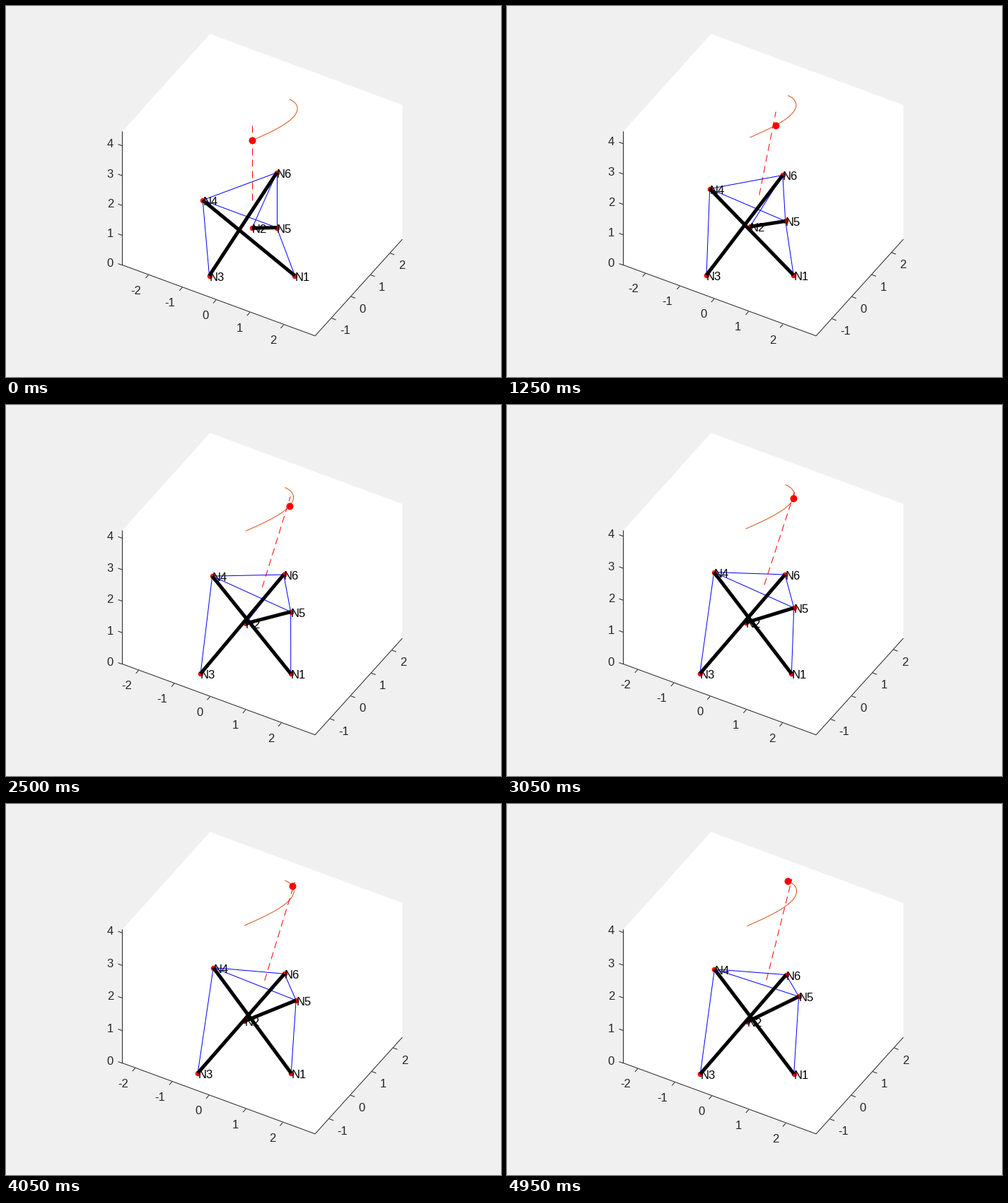
Recreate the animation shown at these times as a matplotlib script. Size 700x525 px, loop 5000 ms.

```python
import numpy as np
import matplotlib.pyplot as plt
from matplotlib.animation import FuncAnimation

W, H, DPI = 700, 525, 100
FRAMES, INTERVAL = 100, 50
PX = 72 / DPI                      # points per pixel
DARK = (0.15, 0.15, 0.15)

# Orthographic view: azimuth 30 deg, elevation 40 deg.
AZ, EL = np.radians([30, 40])
CORNER, FRONT, RIGHT = (164, 366), (436.6, 466.3), (560, 329.6)
BOX = [(164, 177), (288, 39), (560, 139.5), RIGHT, FRONT, CORNER]

RADIUS = 1.267                     # both triangles
AXIS_LENGTH = 2.5                  # dashed normal of the upper triangle
CABLES = [(4, 6), (4, 3), (4, 5), (6, 5), (6, 2), (5, 1)]
BARS = [(3, 6), (4, 1), (2, 5)]


def waves(u):
    """Quarter wave that climbs to 1, half wave that swings out and back."""
    return np.sin(np.pi * u / 2), np.sin(np.pi * u)


def smoothstep(x):
    x = np.clip(x, 0, 1)
    return x * x * (3 - 2 * x)


def dot_path(u):
    rise, sway = waves(u)
    return np.array([0.45 * sway, 1.9 * rise, 4 + 0 * u])


def triangle(centre, ex, ey, start):
    angles = np.radians(start + 120 * np.arange(3))
    return [centre + RADIUS * (np.cos(a) * ex + np.sin(a) * ey)
            for a in angles]


def platform(u):
    """Centre, unit normal and corners of the tilting upper triangle."""
    rise, sway = waves(u)
    centre = np.array([0.19 * u + 0.13 * sway, 0.58 * rise, 2])
    nx = 0.11 * sway - 0.024 * u
    ny = np.sin(0.545 * rise)
    nz = np.sqrt(1 - nx**2 - ny**2)
    k = 1 / (1 + nz)
    ex = np.array([1 - k * nx**2, -k * nx * ny, -nx])
    ey = np.array([-k * nx * ny, 1 - k * ny**2, -ny])
    twist = 4.5 * u
    return centre, np.array([nx, ny, nz]), triangle(centre, ex, ey, 210 + twist)


class View:
    """Axes limits drift with time while the box stays in place."""

    def __init__(self, u):
        rise, sway = waves(u)
        self.scale = 47.75 + 4.5 * smoothstep(1.1 * u)
        depth = 51 - u
        x = 347.5 - 8.5 * rise - 6 * u * sway
        zero_x = x - depth
        y = (CORNER[1] + 0.3 + np.sin(EL) * np.tan(AZ) * (zero_x - CORNER[0])
             - np.sin(EL) / np.tan(AZ) * depth)
        self.origin = x, y
        self.x_min = (CORNER[0] - zero_x) / self.scale
        self.x_max = (FRONT[0] - zero_x) / self.scale
        self.y_min = -depth / (self.scale * np.tan(AZ))

    def project(self, p):
        x, y, z = p
        right = x + np.tan(AZ) * y
        down = (np.sin(EL) * (np.tan(AZ) * x - y)
                - np.cos(EL) / np.cos(AZ) * z)
        return (self.origin[0] + self.scale * right,
                self.origin[1] + self.scale * down)


BASE = triangle(np.zeros(3), *np.eye(3)[:2], 0)
TRAIL = dot_path(np.linspace(0, 1, 90))

plt.rcParams["font.family"] = "Liberation Sans"
fig = plt.figure(figsize=(W / DPI, H / DPI), dpi=DPI, facecolor="#f0f0f0")
ax = fig.add_axes([0, 0, 1, 1])
ax.set_xlim(-0.5, W - 0.5)
ax.set_ylim(H - 0.5, -0.5)
ax.axis("off")


def line(color, width, z, **kw):
    return ax.plot([], [], color=color, lw=width * PX, zorder=z,
                   solid_capstyle="butt", dash_capstyle="butt", **kw)[0]


def label(text, color, ha, z):
    return ax.text(0, 0, text, color=color, ha=ha, va="baseline",
                   fontsize=16.67 * PX, zorder=z)


def dots(size, z):
    return line("red", 0, z, marker="o", ms=size * PX, mew=0, ls="none")


def make_ticks(values, ha):
    return [(v, line(DARK, 1, 2), label(str(v), DARK, ha, 2)) for v in values]


def place_ticks(ticks, spot, arm, shift):
    for v, mark, text in ticks:
        x, y = spot(v)
        mark.set_data([x, x + arm[0]], [y, y + arm[1]])
        text.set_position((x + shift[0], y + shift[1]))


def connect(art, points):
    art.set_data(*np.transpose(points))


ax.fill(*np.transpose(BOX), color="white", lw=0, zorder=0)
connect(line(DARK, 1, 2), [BOX[0], CORNER, FRONT, RIGHT])

x_ticks = make_ticks(range(-2, 3), "right")
y_ticks = make_ticks(range(-1, 3), "left")
z_ticks = make_ticks(range(5), "right")

trail = line((0.85, 0.325, 0.098), 1, 3)
axis_line = line("red", 1, 4, ls=(0, (10, 6)))
cables = [line("blue", 1, 5) for _ in CABLES]
node_dots = dots(7.5, 6)
bars = [line("black", 5, 7) for _ in BARS]
head = dots(10, 8)
names = [label(f"N{i}", "black", "left", 9) for i in range(1, 7)]


def draw(i):
    u = i / (FRAMES - 1)
    view = View(u)
    project = view.project

    place_ticks(x_ticks, lambda v: project((v, view.y_min, 0)),
                (-4, 4.5), (-10, 27))
    place_ticks(y_ticks, lambda v: project((view.x_max, v, 0)),
                (6, 2.2), (11.5, 22.5))
    place_ticks(z_ticks, lambda v: project((view.x_min, view.y_min, v)),
                (-6, -2.2), (-12.5, 2.5))

    centre, normal, top = platform(u)
    nodes = [project(p) for p in BASE + top]
    for art, (a, b) in zip(cables + bars, CABLES + BARS):
        connect(art, [nodes[a - 1], nodes[b - 1]])
    connect(node_dots, nodes)
    for text, (x, y) in zip(names, nodes):
        text.set_position((x, y + 7))

    connect(axis_line, [project(centre),
                        project(centre + AXIS_LENGTH * normal)])
    trail.set_data(*project(TRAIL))
    connect(head, [project(dot_path(u))])
    return []


anim = FuncAnimation(fig, draw, frames=FRAMES, interval=INTERVAL, repeat=True,
                     init_func=lambda: draw(0))
plt.show()
```
